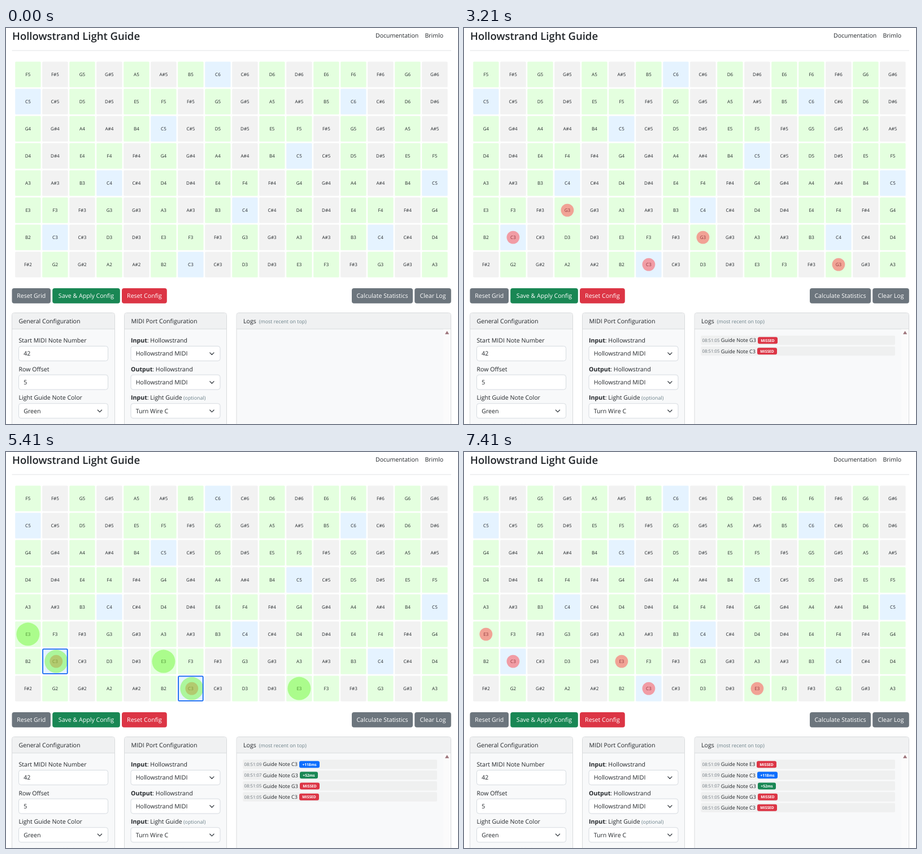
Write an HTML page that moves like this. It is 800x700 px and loops after 8000 ms.

```html
<!DOCTYPE html>
<html lang="en">
<head>
<meta charset="utf-8">
<title>Light Guide</title>
<style>
  html, body { margin: 0; width: 100%; height: 100%; overflow: hidden; background: #fff; }
  svg { display: block; width: 800px; height: 700px; }
  text { font: 10.6px "Open Sans", "Noto Sans", sans-serif; fill: #212529; text-rendering: geometricPrecision; white-space: pre; }
  .bold { font-weight: 700; }
  .mid { text-anchor: middle; }
</style>
</head>
<body>
<svg id="stage" viewBox="0 0 800 700"></svg>
<script>
const LOOP = 8000;
const RED = '#dc3545', GREEN = '#198754', BLUE = '#0d6efd', GRAY = '#6c757d';
const MISS = '#b5161f', GOOD = '#14ac2c', LATE = '#1468f2';
const NAMES = ['C', 'C#', 'D', 'D#', 'E', 'F', 'F#', 'G', 'G#', 'A', 'A#', 'B'];
const stage = document.getElementById('stage');

function add(tag, attrs, parent = stage) {
  const el = document.createElementNS('http://www.w3.org/2000/svg', tag);
  for (const k in attrs) el.setAttribute(k, attrs[k]);
  parent.append(el);
  return el;
}

function rect(x, y, width, height, fill, more = {}, parent) {
  return add('rect', { x, y, width, height, fill, ...more }, parent);
}

function text(str, x, y, { size = 10.6, fill = '#212529', weight = 400, cls = '' } = {}, parent) {
  const el = add('text', { x, y, class: cls, style: `font-size:${size}px;font-weight:${weight};fill:${fill}` }, parent);
  el.textContent = str;
  return el;
}

function span(el, str, style, cls = '') {
  add('tspan', { style, class: cls }, el).textContent = str;
}

// Page header
text('Hollowstrand Light Guide', 11, 20.7, { size: 18.5, weight: 600 });
text('Documentation', 654, 17.4, { size: 10.5 });
text('Brimlo', 741.5, 17.4, { size: 10.5 });
rect(10.5, 39.4, 777.5, 1, '#e2e3e4');

// Note grid
const START = 42, OFFSET = 5;
const pads = {};
for (let row = 0; row < 8; row++) {
  for (let col = 0; col < 16; col++) {
    const note = START + OFFSET * (7 - row) + col;
    const name = NAMES[note % 12];
    const label = name + (Math.floor(note / 12) - 1);
    const cx = 38.9 + 48 * col, cy = 82.1 + 48 * row;
    const fill = name === 'C' ? '#e5f3ff' : name.length > 1 ? '#f2f2f2' : '#e4ffdf';
    rect(cx - 22.7, cy - 22.7, 45.4, 45.4, fill, { rx: 1.5 });
    text(label, cx, cy + 2.8, { size: 8, cls: 'mid' });
    (pads[label] ||= []).push([cx, cy]);
  }
}

// When each note is guided, played and judged
const notes = {
  C3: { guide: [[1200, 2000], [5410, 6610]],
        played: [[1800, 3410], [5410, LOOP]],
        judged: [[1800, 3210, MISS], [5410, 7010, LATE]] },
  E3: { guide: [[5410, 6610]],
        played: [[6410, LOOP]],
        judged: [[5810, 7410, MISS]] },
  G3: { guide: [[1200, 2000], [3610, 3810]],
        played: [[1800, 3410], [3610, 5410], [5610, 6210]],
        judged: [[1800, 3210, MISS], [3610, 5210, GOOD]] }
};
const marks = Object.keys(notes).flatMap(name => pads[name].map(([cx, cy]) => ({
  ...notes[name],
  cx,
  dot: add('circle', { cx, cy, r: 11.4, fill: 'rgba(253,70,75,.5)' }),
  halo: add('circle', { cx, cy, r: 20.5, fill: 'rgba(116,250,58,.5)' }),
  frame: rect(cx - 21.8, cy - 21.8, 43.6, 43.6, 'none', { 'stroke-width': 1.8, rx: 1.5 })
})));

// Buttons
[['Reset Grid', 10.5, 68.5, GRAY], ['Save & Apply Config', 82.2, 119.6, GREEN],
 ['Reset Config', 205, 79.8, RED], ['Calculate Statistics', 612, 108, GRAY],
 ['Clear Log', 723.2, 64.6, GRAY]].forEach(([label, x, w, fill]) => {
  rect(x, 460, w, 26.7, fill, { rx: 4 });
  text(label, x + w / 2, 477.4, { fill: '#fff', cls: 'mid' });
});

// Cards
function card(x, w, title) {
  rect(x, 503.5, w, 220, '#f8f9fa', { rx: 4, stroke: '#d8dadc' });
  add('path', { d: `M${x + .5} 531.5V507.5q0-3.5 3.5-3.5H${x + w - 4}q3.5 0 3.5 3.5V531.5Z`, fill: '#f0f1f2' });
  rect(x, 531.5, w, 1, '#d8dadc');
  return text(title, x + 12, 522);
}

function field(x, y, value, select) {
  rect(x, y, 158, 26, '#fff', { rx: 4, stroke: '#d6dbe0' });
  text(value, x + 8.7, y + 17);
  if (select) {
    add('path', { d: `M${x + 139.8} ${y + 11.5}l3.6 3.6l3.6 -3.6`, fill: 'none', stroke: '#343a40',
      'stroke-width': 1.3, 'stroke-linecap': 'round', 'stroke-linejoin': 'round' });
  }
}

card(10.5, 182, 'General Configuration');
[['Start MIDI Note Number', '42'], ['Row Offset', '5'], ['Light Guide Note Color', 'Green', true],
 ['Played Note Highlight', '']].forEach(([label, value, select], i) => {
  const y = 555.8 + 50.7 * i;
  text(label, 22.5, y);
  field(22.5, y + 6.6, value, select);
});

const HINT = 'font-size:8.9px;fill:#6b8089';
card(209.5, 181, 'MIDI Port Configuration');
[['Input', 'Hollowstrand', 'Hollowstrand MIDI'], ['Output', 'Hollowstrand', 'Hollowstrand MIDI'],
 ['Input', 'Light Guide', 'Turn Wire C', true], ['Output', 'Light Guide', '', true]]
  .forEach(([dir, device, value, optional], i) => {
    const y = 555.8 + 50.7 * i;
    const label = text('', 221, y);
    span(label, dir, '', 'bold');
    span(label, ': ' + device, '');
    if (optional) span(label, ' (optional)', HINT);
    field(221, y + 6.6, value, true);
  });

span(card(408, 379.5, 'Logs '), ' (most recent on top)', HINT);
rect(774, 532.5, 13, 168, '#fbfbfb');
add('path', { d: 'M777 541.2L780.6 535.6L784.2 541.2Z', fill: '#9d747b' });

// Log rows, oldest first
const logs = [
  [1800, 'C3', '05', 'MISSED', RED, 519, 35],
  [1800, 'G3', '05', 'MISSED', RED, 520, 35],
  [3610, 'G3', '07', '+52ms', GREEN, 520, 32],
  [5410, 'C3', '09', '+118ms', BLUE, 519, 36],
  [5810, 'E3', '09', 'MISSED', RED, 518, 35]
].map(([at, note, sec, badge, fill, x, w]) => {
  const g = add('g', {});
  rect(419.3, 543.8, 343.7, 16.4, '#eff0f0', { rx: 2 }, g);
  text('08:51:' + sec, 421.5, 555.2, { size: 7.8, fill: GRAY }, g);
  text('Guide Note ' + note, 454.8, 555.4, { size: 9.05 }, g);
  rect(x, 546.2, w, 12, fill, { rx: 3 }, g);
  text(badge, x + w / 2, 554.7, { size: 6.7, fill: '#fff', weight: 700, cls: 'mid' }, g);
  return { at, g };
});

const active = (spans, t) => spans.find(([from, to]) => t >= from && t < to);
const show = (el, on) => el.setAttribute('visibility', on ? 'visible' : 'hidden');

function draw(t) {
  for (const m of marks) {
    const verdict = active(m.judged, t);
    show(m.frame, verdict);
    if (verdict) m.frame.setAttribute('stroke', verdict[2]);
    // The frame's border pushes the circles aside
    const cx = m.cx + (verdict ? 1.9 : 0);
    m.dot.setAttribute('cx', cx);
    m.halo.setAttribute('cx', cx);
    show(m.dot, active(m.played, t));
    show(m.halo, active(m.guide, t));
  }
  const count = logs.filter(l => t >= l.at).length;
  logs.forEach((l, i) => {
    show(l.g, i < count);
    l.g.setAttribute('transform', `translate(0 ${19.15 * Math.max(0, count - 1 - i)})`);
  });
}

const begin = performance.now();
function tick() {
  draw((performance.now() - begin) % LOOP);
  requestAnimationFrame(tick);
}
tick();
</script>
</body>
</html>
```
